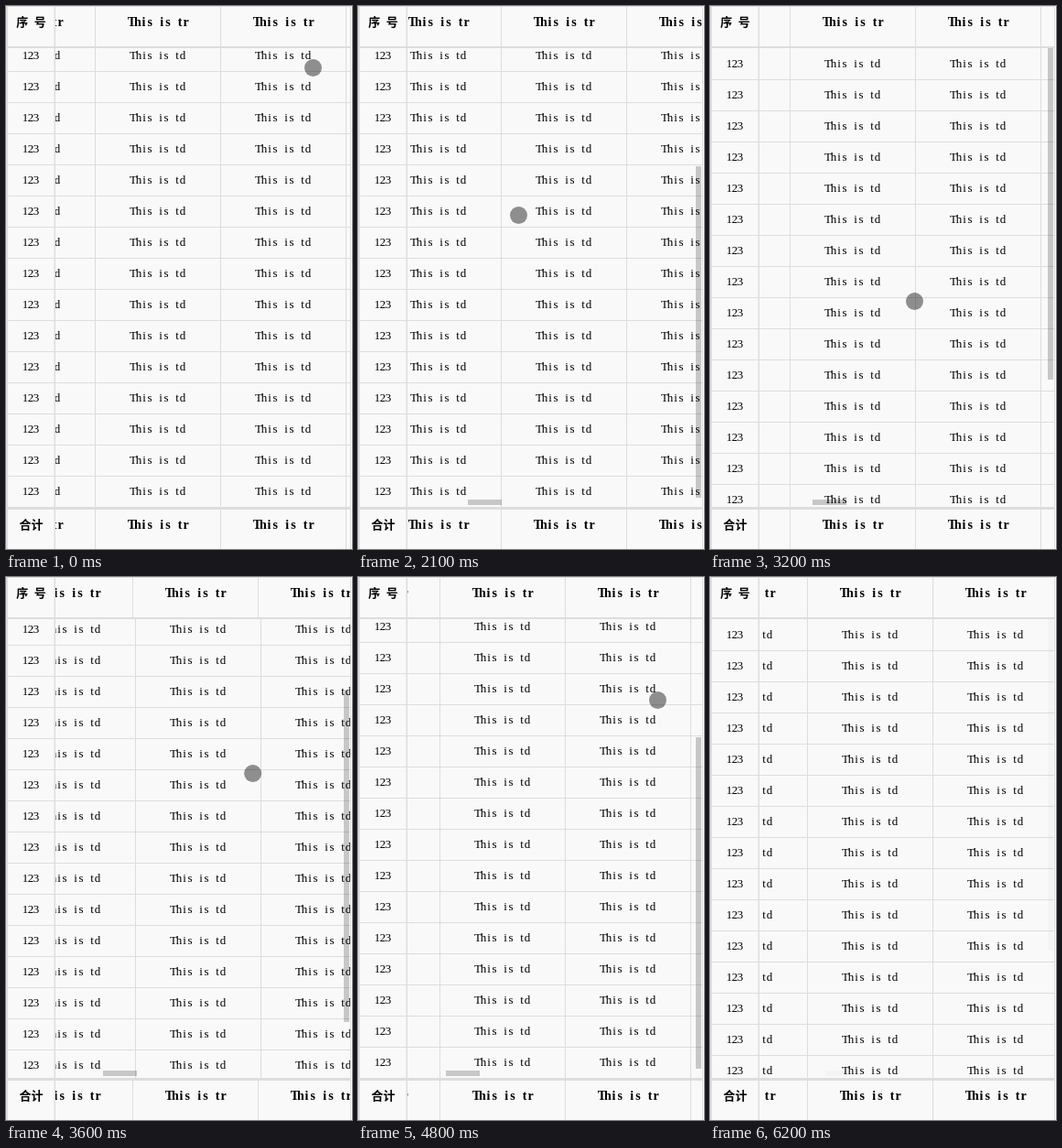
Animation of 378 by 593 pixels, one loop 6400 ms. Source, as an HTML page with a canvas:

```html
<!DOCTYPE html>
<html lang="zh">
<head>
<meta charset="utf-8">
<style>
  html, body { margin: 0; width: 100%; height: 100%; overflow: hidden; background: #fff; }
  canvas { display: block; }
</style>
</head>
<body>
<canvas id="stage" width="378" height="593"></canvas>
<script>
const ctx = document.getElementById('stage').getContext('2d');
const LOOP = 6400, STEP = 100, HEADER_LAG = 40;
const COL = 137, ROW = 34, COUNT = 20;
const LEFT = 54, RIGHT = 376, TOP = 46, BOTTOM = 547;
const VIEW_W = RIGHT - LEFT, VIEW_H = BOTTOM - TOP;
const MAX_Y = COUNT * ROW - VIEW_H;
const LINE = '#ddd';
const SERIF = '"Liberation Serif", serif';
const CJK = 'bold 13px "Noto Sans CJK SC", "Noto Sans CJK", sans-serif';

// Drag ends: scroll offset, pointer, and how far the pointer bows sideways on the way there
const poses = [
  { t: 0, sx: 1190, sy: MAX_Y, px: 335, py: 67 },
  { t: 700, sx: 1190, sy: MAX_Y, px: 300, py: 236, bow: -210 },
  { t: 800, sx: 1409, sy: MAX_Y, px: 81, py: 236 },
  { t: 2100, sx: 583, sy: MAX_Y, px: 175, py: 228, bow: 400 },
  { t: 2800, sx: 583, sy: 0, px: 155, py: 335 },
  { t: 3200, sx: 515, sy: 0, px: 223, py: 322 },
  { t: 3700, sx: 460, sy: 110, px: 270, py: 212 },
  { t: 4100, sx: 567, sy: 0, px: 124, py: 349 },
  { t: 4800, sx: 376, sy: MAX_Y, px: 327, py: 134 },
  { t: 5600, sx: 633, sy: 0, px: 98, py: 309 },
  { t: 5900, sx: 633, sy: 0, px: 405, py: 65 },
];

// Smooth move that settles shortly before its time is up
function ease(u) {
  u = Math.min(1, u * 1.15);
  return u * u * (3 - 2 * u);
}

function poseAt(t) {
  t = Math.max(0, Math.min(t, poses.at(-1).t));
  const n = Math.max(1, poses.findIndex(p => p.t >= t));
  const a = poses[n - 1], b = poses[n];
  const u = ease((t - a.t) / (b.t - a.t));
  const mix = key => a[key] + (b[key] - a[key]) * u;
  return {
    sx: mix('sx'), sy: mix('sy'), py: mix('py'),
    px: mix('px') + (b.bow || 0) * Math.sin(Math.PI * u),
  };
}

function rect(x, y, w, h, color = LINE) {
  ctx.fillStyle = color;
  ctx.fillRect(x, y, w, h);
}

function clipped(x, y, w, h, draw) {
  ctx.save();
  ctx.beginPath();
  ctx.rect(x, y, w, h);
  ctx.clip();
  draw();
  ctx.restore();
}

function label(text, x, y, font) {
  ctx.font = font;
  ctx.fillStyle = '#000';
  ctx.fillText(text, x, y);
}

// Serif letters on a fixed-pitch grid, centred on cx
function mono(text, cx, y, font, pitch) {
  [...text].forEach((c, i) =>
    label(c, cx + (i + 0.5 - text.length / 2) * pitch, y, font));
}
const cell = (text, cx, y) => mono(text, cx, y, '13px ' + SERIF, 6);
const head = (text, cx, y) => mono(text, cx, y, 'bold 14px ' + SERIF, 6.6);

function eachColumn(sx, draw) {
  for (let c = 0; c < COUNT; c++) {
    const x = Math.round(LEFT + c * COL - sx);
    if (x > -COL && x < RIGHT) draw(x);
  }
}

function eachRow(sy, draw) {
  for (let r = 1; r <= COUNT; r++) {
    const y = Math.round(TOP + r * ROW - sy);
    if (y > TOP && y < BOTTOM + ROW) draw(y);
  }
}

function band(y, h, baseline, title, sx) {
  clipped(LEFT, y, VIEW_W, h, () => eachColumn(sx, x => {
    rect(x, y, 1, h);
    head('This is tr', x + 70, baseline);
  }));
  label(title, 27.5, baseline, CJK);
}

function body({ sx, sy }) {
  clipped(2, TOP, RIGHT - 2, VIEW_H, () => eachRow(sy, y => {
    rect(2, y, RIGHT - 2, 1);
    cell('123', 27, y - 13);
  }));
  clipped(LEFT, TOP, VIEW_W, VIEW_H, () => eachColumn(sx, x => {
    rect(x, TOP, 1, VIEW_H);
    eachRow(sy, y => cell('This is td', x + 69, y - 13));
  }));
}

function thumbs(t, { sx, sy }) {
  const alpha = t < 800 ? 0 : t < 6100 ? 0.2 : t < 6200 ? 0.1 : 0.02;
  const color = `rgba(0,0,0,${alpha})`;
  rect(Math.round(LEFT - 1 + sx * 0.115), 539, 37, 6, color);
  rect(369, Math.round(TOP + sy * 0.72), 6, 362, color);
}

function touch({ px, py }) {
  ctx.fillStyle = 'rgba(0,0,0,.43)';
  ctx.beginPath();
  ctx.arc(px + 0.5, py + 0.5, 9.5, 0, Math.PI * 2);
  ctx.fill();
}

function render(t) {
  const pose = poseAt(t), headerX = poseAt(t - HEADER_LAG).sx;
  ctx.textAlign = 'center';
  rect(0, 0, 378, 593, '#fff');
  rect(0, 0, 377, 593, '#f9f9f9');
  body(pose);
  band(1, 43, 22, '序\u2002号', headerX);
  band(549, 44, 571, '合计', headerX);
  rect(0, 0, 377, 1);
  rect(0, 44, 377, 2);
  rect(0, BOTTOM, 377, 3);
  rect(0, 0, 2, 593);
  rect(52.5, 0, 1.5, 593);
  rect(RIGHT, 0, 1, 593);
  thumbs(t, pose);
  touch(pose);
}

const start = performance.now();
function tick() {
  const t = (performance.now() - start) % LOOP;
  render(Math.floor(t / STEP) * STEP);
  requestAnimationFrame(tick);
}
tick();
</script>
</body>
</html>
```
